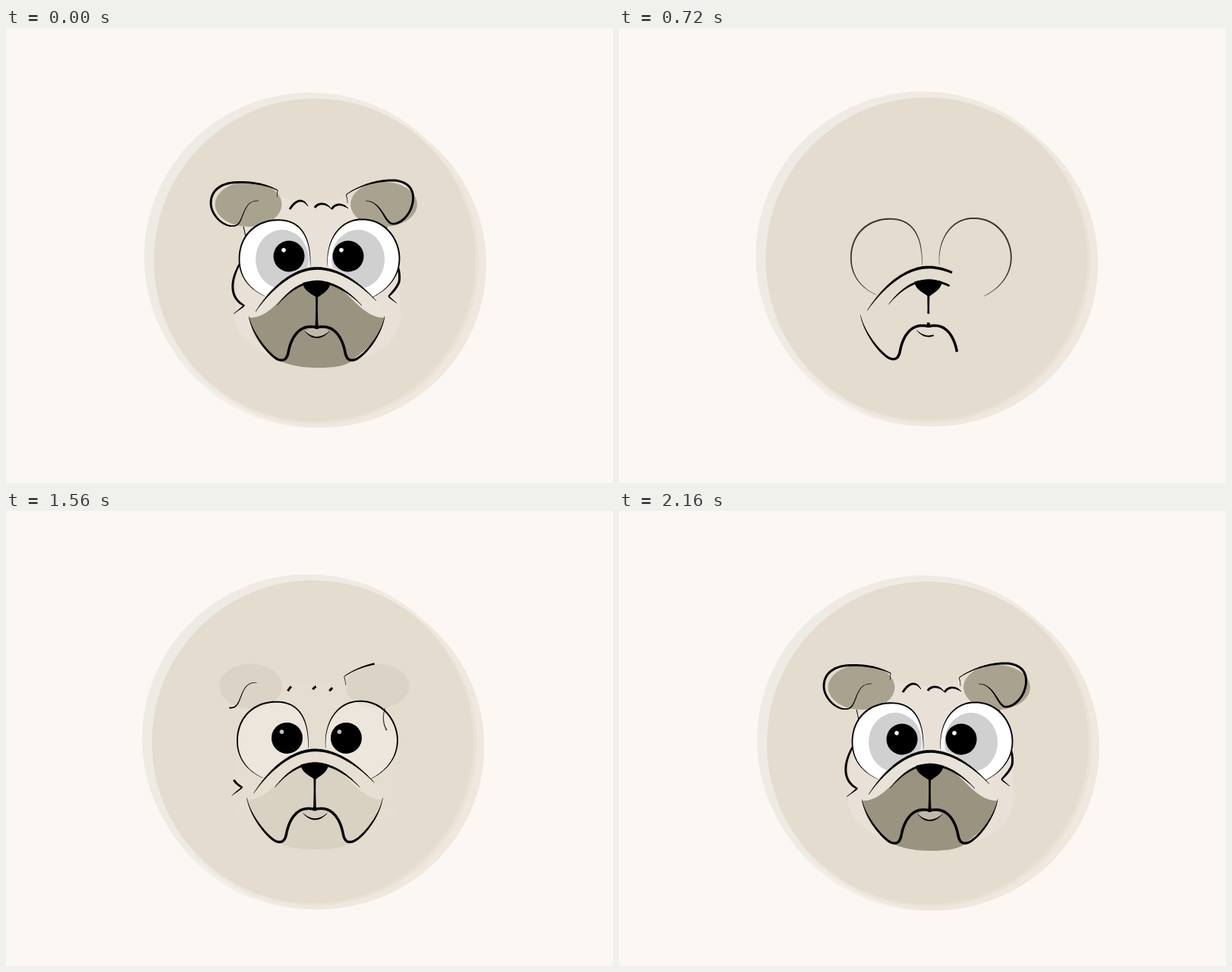
Recreate the animation shown at these times as an HTML page with a canvas. Size 800x600 px, loop 2.2 s.

```html
<!DOCTYPE html>
<html lang="en">
<head>
<meta charset="utf-8">
<title>Pug</title>
<style>
  html, body { margin: 0; width: 100%; height: 100%; overflow: hidden; background: #fbf8f3; }
  canvas { display: block; }
</style>
</head>
<body>
<canvas width="800" height="600"></canvas>
<script>
const ctx = document.querySelector('canvas').getContext('2d');
const LOOP = 2200, STEP = 40;

const clamp = v => Math.min(1, Math.max(0, v));
const ramp = (t, from, to) => clamp((t - from) / (to - from));
const mix = (a, b, k) => a + (b - a) * k;

// Slow sway of the whole drawing: [time, x, y] stops.
const drift = [[240, -.4, -.5], [400, -.8, -1], [720, -1.7, -1.5], [1240, -1.8, -1.7],
               [1560, -2.6, -1.6], [1760, -3, -1], [2160, 0, 0]];
function driftAt(t) {
  const i = Math.max(1, drift.findIndex(s => s[0] >= t));
  const [a, b] = [drift[i - 1], drift[i]], k = ramp(t, a[0], b[0]);
  return [mix(a[1], b[1], k), mix(a[2], b[2], k)];
}

// A brush line: a path sampled into points with a tapering half width.
function brush(d, widths, start, end) {
  const path = document.createElementNS('http://www.w3.org/2000/svg', 'path');
  path.setAttribute('d', d);
  const length = path.getTotalLength(), n = Math.ceil(length / 1.5), samples = [];
  for (let i = 0; i <= n; i++) {
    const at = length * i / n, p = path.getPointAtLength(at);
    const a = path.getPointAtLength(at - .5), b = path.getPointAtLength(at + .5);
    const size = Math.hypot(b.x - a.x, b.y - a.y) || 1;
    const w = i / n * (widths.length - 1), j = Math.min(Math.floor(w), widths.length - 2);
    const half = mix(widths[j], widths[j + 1], w - j) / 2 / size;
    samples.push({ x: p.x, y: p.y, nx: (a.y - b.y) * half, ny: (b.x - a.x) * half });
  }
  return { samples, start, end };
}

function paint({ samples, start, end }, t, color = '#000') {
  const shown = samples.slice(0, Math.round(ramp(t, start, end) * samples.length));
  if (shown.length < 2) return;
  ctx.beginPath();
  shown.forEach(s => ctx.lineTo(s.x + s.nx, s.y + s.ny));
  shown.reverse().forEach(s => ctx.lineTo(s.x - s.nx, s.y - s.ny));
  ctx.fillStyle = color;
  ctx.fill();
}

function fill(path, color, alpha) {
  ctx.globalAlpha = alpha;
  ctx.fillStyle = color;
  ctx.fill(path);
  ctx.globalAlpha = 1;
}

// Fills the part of an ellipse cut off by the chord of the arc traced so far.
function disc(x, y, rx, ry, color, alpha = 1, traced = 1) {
  const path = new Path2D();
  path.ellipse(x, y, rx, ry, 0, -1.22, -1.22 + Math.PI * 2 * traced);
  fill(path, color, alpha);
}

const leftEye = 'M341 353.5C318 343 307 325 307.5 303.5C308 273 330 253.3 358 253.3C390 252.5 402 278 401 314';
const rightEye = 'M424 314C421 283 438 252.4 469 252.4C500 252 519 279.5 518.5 305C518 328 503 345 483 355';
const eyeWidths = [.4, 1.8, 2.2, 1.8, .5];
const eyeLines = [
  brush(leftEye, eyeWidths, 220, 420),
  brush(rightEye, eyeWidths, 220, 500)
];
const eyes = [
  { white: new Path2D(leftEye + 'Q370 324 341 353'), iris: 364, pupil: 373, glint: 366, start: 1720, end: 2080 },
  { white: new Path2D(rightEye + 'Q455 324 424 314'), iris: 464, pupil: 451, glint: 442, start: 1660, end: 1990 }
];

const muzzleLines = [
  ['M329 374C350 342 380 317 410 317C438 317 466 336 488 360', [.5, 3, 3.8, 3, .5]],
  ['M357 366C372 347 390 334.5 410 334.5C430 335 450 346 469 366', [.5, 2.5, 3.5, 2.5, .5]],
  ['M409.5 352V390', [3, 2.5, 3.5]],
  ['M409.5 390V397', [4, 4]],
  ['M320 380C324 402 345 430 358 437C366 440 370 437 372 428C375 411 384 394.5 400 394Q405 393.8 409.5 395' +
   'Q414 393.8 419 394C435 394.5 444 411 447 428C449 437 453 440 461 437C475 430 496 402 499 380',
   [.5, 2.5, 3.5, 3.5, 3.5, 3.5, 2.5, .5]],
  ['M394 400Q409.5 416 426 400', [.5, 2, 2, .5]]
].map(([d, w]) => brush(d, w, 420, 850));

const hairWidths = [3, 3, 2.6, .8];
const headLines = [
  ['M333 228C312 226 314 254 304 260C290 266 270 248 270 231C270 213 285 204 304 203.5C325 202.5 345 207 358 214L357 223',
   [.6, 1.2, 2.6, 3, 3, 2.6, .5]],
  ['M450 231Q450 224 448 220C460 211 485 200 513 201C530 203 539 213 536 230C533 248 518 260 508 258C498 254 494 228 474 228',
   [.6, 1.4, 2.8, 3, 3, 3, 2, .6]],
  ['M300 377L314 366C296 357 294 336 308 311C317 297 318 280 313 262', [.5, 3, 3, 2.5, 1, 1]],
  ['M502 262C498 275 500 285 507 295C517 310 520 325 518 335C515 343 508 350 504 354L515 363', [1, 1.5, 2.8, 3, 3, .5]],
  ['M374 239C380 229 390 222 398 235', hairWidths],
  ['M407 237C411 230 422 230 428 238', hairWidths],
  ['M429 239C434 231 443 231 451 238', hairWidths]
].map(([d, w]) => brush(d, w, 1440, 1895));

const face = new Path2D('M360 222Q410 238 453 222L505 262Q520 300 519 365C527 395 505 430 460 437' +
  'L360 437C325 425 295 400 303 372Q304 300 315 262Z');
const muzzleTop = 'C475 383 458 357 441 344C428 333 392 333 378 344C360 357 346 383 320 382';
const band = new Path2D('M329 374C350 342 380 317 410 317C438 317 466 336 488 360L499 382' + muzzleTop + 'Z');
const muzzle = new Path2D('M499 382' + muzzleTop +
  'C325 405 335 422 358 437C368 443 385 448 412 448C430 448 450 446 458 437C480 420 495 405 499 382Z');
const lip = new Path2D('M394 400Q400 394 409.5 396Q420 394 426 400Q409.5 416 394 400Z');
const nose = new Path2D('M391 336C400 333 420 333 427.5 336C427 345 418 350 410 356C402 350 392 346 391 336Z');

function backdrop(t) {
  const p = ramp(t, 230, 600), scale = 1 - .26 * (1 - p) ** 2;
  ctx.save();
  ctx.translate(407, 306);
  ctx.scale(scale, scale);
  disc(-2, 2, 219, 219, '#f3f0eb', p);
  disc(7, 6, 219, 215, '#f0e7de', p);
  disc(-6, -4, 219, 217, '#eeebe4', p);
  disc(2, 2, 214, 214, '#e8dfd3', p * .6);
  disc(0, 0, 212, 213, '#e4dccf', p);
  ctx.restore();
}

function drawEye({ white, iris, pupil, glint, start, end }, t) {
  fill(white, '#fff', ramp(t, 1400, 2000));
  ctx.save();
  ctx.clip(white);
  disc(iris, 305, 35, 39, '#d0d0d0', ramp(t, 1300, 2000), ramp(t, start, end));
  ctx.restore();
  disc(pupil, 301, 20.5, 20.5, '#000', 1, ramp(t, 1140, 1540));
  disc(glint, 292.8, 2.8, 2.8, '#fff', ramp(t, 1140, 1700));
}

function draw(t) {
  ctx.fillStyle = '#fbf8f3';
  ctx.fillRect(0, 0, 800, 600);
  if (t < 240) return;
  ctx.save();
  ctx.translate(...driftAt(t));
  backdrop(t);

  fill(face, '#e9e1d7', ramp(t, 1500, 2100));
  const ears = ramp(t, 1300, 2160) ** 1.5, settle = ramp(t, 1760, 2160);
  disc(mix(325, 319.5, settle), 232.5, mix(41.5, 44, settle), 29.5, '#a8a28f', ears);
  disc(mix(492, 498, settle), 232.5, mix(42, 44, settle), 29.5, '#a8a28f', ears);
  headLines.forEach(line => paint(line, t));

  eyes.forEach(eye => drawEye(eye, t));
  const k = 1 - ramp(t, 400, 850);
  const ink = `rgba(${153 * k}, ${147 * k}, ${127 * k}, ${1 - .3 * k})`;
  eyeLines.forEach(line => paint(line, t, ink));

  const shade = ramp(t, 1470, 2000);
  fill(band, '#e8e3d8', shade);
  fill(muzzle, '#99937f', shade);
  fill(lip, '#c0b9a9', shade);
  fill(nose, '#000', ramp(t, 460, 660));
  muzzleLines.forEach(line => paint(line, t));
  ctx.restore();
}

function tick() {
  const t = Math.floor(performance.now() % LOOP / STEP) * STEP;
  draw(t < STEP ? LOOP - STEP : t);
  requestAnimationFrame(tick);
}
tick();
</script>
</body>
</html>
```
